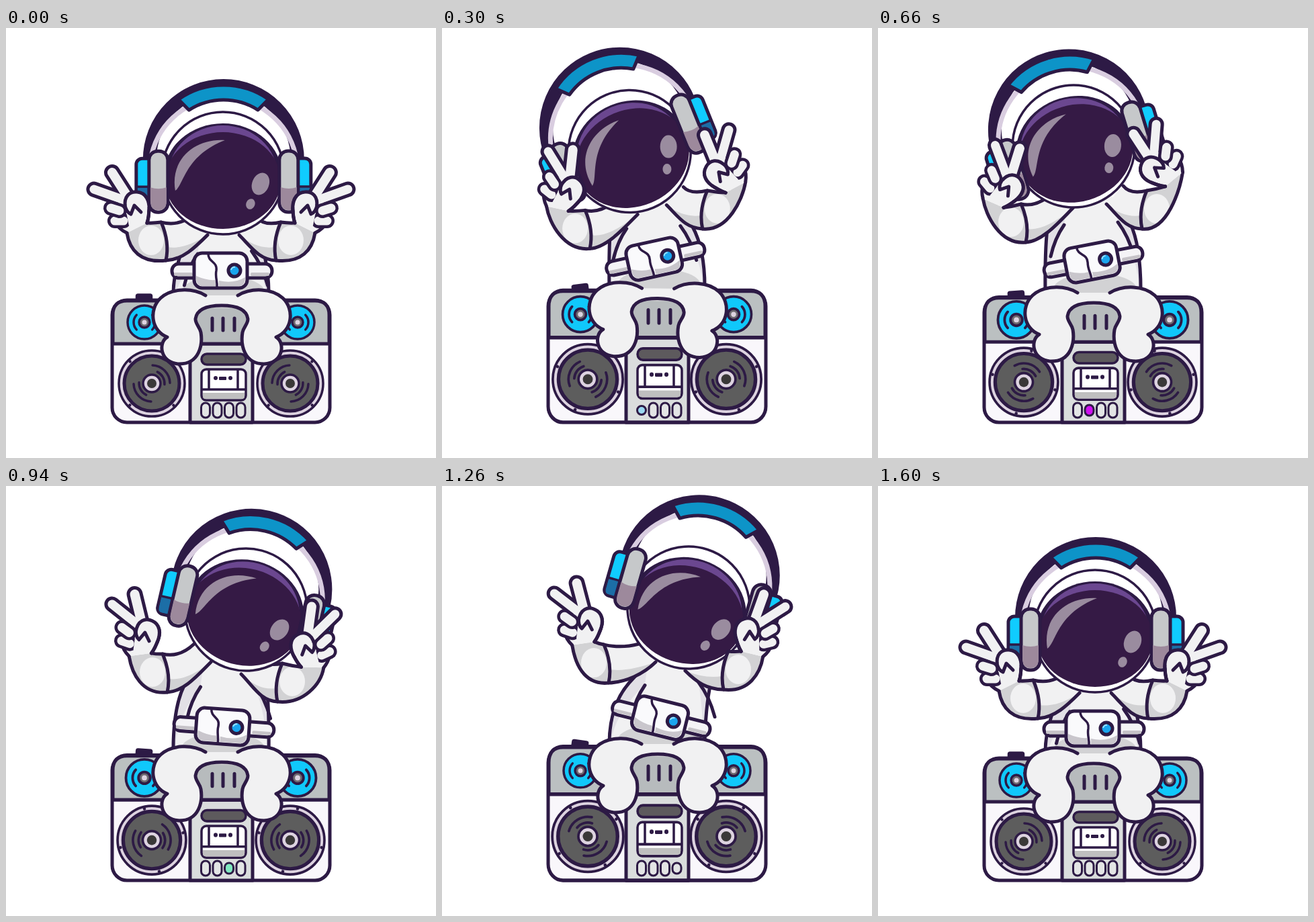
An HTML page that plays this animation: 640x640 px, repeating every 1.62 s.

```html
<!DOCTYPE html>
<html lang="en">
<head>
<meta charset="utf-8">
<title>Astronaut on a boombox</title>
<style>
html, body { margin: 0; width: 100%; height: 100%; overflow: hidden; background: #fff; }
svg { display: block; width: 100vw; height: 100vh; }
.o { stroke: #2d1a45; stroke-width: 5; stroke-linecap: round; stroke-linejoin: round; }
.t { stroke-width: 3.5; }
.n { fill: none; }
.suit { fill: #f1f1f2; }
.shade { fill: #d2d2d4; }
.ink { fill: #2d1a45; }
</style>
</head>
<body>
<svg id="stage" viewBox="0 0 640 640"></svg>
<script>
const LOOP = 1620, SPAN = 1600;
const times = [0, 160, 480, 660, 940, 1260];

// x, y, angle
const headKeys = [[323, 216, 0], [293, 196, -15], [271, 172, -28], [291, 176, -17], [357, 184, 15], [367, 181, 18]];
const phoneKeys = [[324, 228, 0], [295, 199, -14.5], [264, 161, -27], [293, 182, -17], [358, 185, 13], [374, 164, 16]];
const pouchKeys = [[319, 361, 0], [317, 351, -7], [314, 338, -17], [318, 348, -11], [322, 358, 4], [324, 345, 14]];
// box stretch, leg lift, leg angle, tweeter scale, woofer scale
const baseKeys = [[1, 0, 0, 1, 1], [1.052, -4, 0, 1.1, 1.04], [1.092, -16, 1.5, 1, 1.08],
  [1.024, -4, 0, 1.1, 1.04], [1.024, -2, 0, 1.1, 1.04], [1.095, -14, 0, 1, 1.08]];
// hand x, y, angle, sleeve dx, dy, shoulder x, y
const leftKeys = [[193, 260, 0, 0, 0, 300, 308], [191, 242, 23, -10, -9, 297, 288], [198, 237, 54, -25, -27, 285, 268],
  [199, 235, 50, -18, -27, 290, 268], [210, 215, 19, 2, -39, 305, 262], [220, 198, 18, 10, -53, 318, 262]];
const rightKeys = [[193, 260, 0, 0, 0, 293, 308], [216, 228, 35, 8, -29, 300, 280], [247, 203, 72, 19, -62, 310, 250],
  [233, 208, 66, 9, -47, 300, 262], [198, 235, 25, -2, -25, 290, 280], [185, 213, 13, -17, -43, 278, 275]];

// cyclic cubic through the keys
function sample(keys, t) {
  t %= SPAN;
  const n = times.length;
  const at = i => times[(i + n) % n] + SPAN * Math.floor(i / n);
  let i = n - 1;
  while (times[i] > t) i--;
  const h = at(i + 1) - at(i), u = (t - at(i)) / h, u2 = u * u, u3 = u2 * u;
  return keys[0].map((_, c) => {
    const v = j => keys[(j + n) % n][c];
    const slope = j => (v(j + 1) - v(j - 1)) / (at(j + 1) - at(j - 1)) * h;
    return v(i) * (2 * u3 - 3 * u2 + 1) + v(i + 1) * (3 * u2 - 2 * u3) +
      slope(i) * (u3 - 2 * u2 + u) + slope(i + 1) * (u3 - u2);
  });
}

const rect = (x, y, w, h, r, fill, cls = 'o') =>
  `<rect x="${x}" y="${y}" width="${w}" height="${h}" rx="${r}" fill="${fill}" class="${cls}"/>`;
const disc = (r, fill, cls = '') => `<circle r="${r}" fill="${fill}" class="${cls}"/>`;
const line = (d, cls = 'o n') => `<path d="${d}" class="${cls}"/>`;
const stroke = (d, color, w) =>
  `<path d="${d}" fill="none" stroke="${color}" stroke-width="${w}" stroke-linecap="round"/>`;
const flip = (s, w = 640) => `<g transform="translate(${w} 0) scale(-1 1)">${s}</g>`;
const both = s => s + flip(s, 0);

function arcPair(r, half) {
  const x = r * Math.cos(half), y = r * Math.sin(half);
  return `M${x} ${-y}A${r} ${r} 0 0 1 ${x} ${y}M${-x} ${y}A${r} ${r} 0 0 1 ${-x} ${-y}`;
}

const screws = [45, 135, 225, 315].map(a =>
  `<circle cx="46" r="2.2" class="ink" transform="rotate(${a})"/>`).join('');
const woofer = disc(49, '#ddd3e0', 'o t') + `<g class="spin">${screws}</g>` +
  disc(41, '#5d5d5d', 'o') +
  `<g class="spin"><path d="${arcPair(27, .75)}" class="o t n" transform="rotate(-45)"/>
  <path d="${arcPair(19, .6)}" class="o t n" transform="rotate(-30)"/></g>` +
  disc(13, '#ddd3e0', 'o t') + disc(7, '#3a3838');
const tweeter = disc(25, '#10c8fb', 'o t') +
  line(arcPair(16, .75), 'o t n') + disc(8, '#6d6a70', 'o t') + disc(3.5, '#ddd3e0');

const box = rect(158, 405, 324, 182, 22, '#f9f7fb') +
  `<path d="M159 470V427Q159 406 180 406H460Q481 406 481 427V470Z" class="o" fill="#bbc0c1"/>` +
  rect(274, 470, 93, 117, 0, '#dadddd') +
  `<path d="M274 470H367L360 430Q350 407 321 407Q292 407 282 430Z" fill="#b7bbbd"/>` +
  line('M274 470H367') + line('M307 432V450M323 432V450M340 432V450') +
  rect(291, 485, 66, 16, 8, '#5d5a5d', 'o t') +
  rect(291, 508, 66, 46, 7, '#fff', 'o t') +
  `<path d="M293 543H355V549Q355 552 351 552H297Q293 552 293 549Z" fill="#bfbfbf"/>` +
  line('M302 509V537M345 509V537M292 538H356', 'o t n') +
  rect(317, 519, 11, 5, 1, '#2d1a45', '') +
  '<circle cx="312" cy="521" r="3" class="ink"/><circle cx="334" cy="521" r="3" class="ink"/>';

const buttons = [297, 314.5, 332, 349.5].map(x => rect(x - 6.5, 558, 13, 22, 6.5, '#e3e5e5', 'o btn')).join('');

const legs = 'M297 398C277 386 246 387 230 402C212 419 216 451 240 460C226 468 229 499 258 500' +
  'C288 500 293 471 290 453C288 444 282 441 282 433C284 418 300 413 321 413' +
  'C342 413 358 418 360 433C360 441 354 444 352 453C349 471 354 500 384 500' +
  'C413 499 416 468 402 460C426 451 430 419 412 402C396 387 365 386 345 398';

const pouch = rect(-72, -10, 50, 21, 10, '#f4f3f6') + rect(26, -10, 51, 21, 10, '#f4f3f6') +
  rect(-69, 3, 28, 5, 2, '#c6c3c8', '') + rect(45, 3, 28, 5, 2, '#c6c3c8', '') +
  rect(-39, -26, 79, 52, 12, '#fafafc') +
  `<path d="M-36 8Q-20 15 -8 14L-5 23H-28Q-36 22 -36 12ZM-2 15Q20 20 37 10Q37 23 28 23H-2Z" fill="#c9c6cc"/>` +
  line('M-18 -25C-18 -12 -4 -14 -6 0C-8 10 -4 16 -5 25', 'o t n') +
  `<g transform="translate(21 0)">${disc(9, '#1aa5ee', 'o')}<path d="M-5 -1A5 5 0 0 1 1 -5" fill="none" stroke="#9be3ff" stroke-width="2"/></g>`;

const helmet = disc(91, '#fff', 'o t') +
  `<ellipse cy="4" rx="88" ry="78" class="ink"/>
  <ellipse cy="3" rx="81" ry="74" fill="#6b4790"/>
  <ellipse cy="11" rx="86" ry="72" fill="#351a45"/>
  <path d="M3 -49C-40 -52 -79 -22 -71 26C-58 18 -57 -26 3 -49Z" fill="#9a8c9f"/>
  <ellipse cx="56" cy="16" rx="12.5" ry="17" transform="rotate(22 56 16)" fill="#9a8c9f"/>
  <ellipse cx="41" cy="46" rx="6.5" ry="8" transform="rotate(22 41 46)" fill="#9a8c9f"/>`;

function bandPad() {
  const p = (r, a) => `${r * Math.sin(a)} ${-26 - r * Math.cos(a)}`;
  return `<path d="M${p(117, -.61)}A117 117 0 0 1 ${p(117, .61)}L${p(95, .57)}A95 95 0 0 0 ${p(95, -.57)}Z" fill="#0d94c8" class="o"/>`;
}
const bandArc = 'M-107 -40A110 110 0 0 1 107 -40';
const sideBar = 'M-110 -32A110 110 0 0 1 110 -32';
const ear = rect(-130, -34, 28, 68, 9, '#10ccff') +
  '<path d="M-128 8H-104V32H-122Q-128 32 -128 25Z" fill="#1c6ea6"/>' + line('M-129 8H-106', 'o t') +
  rect(-111, -45, 28, 91, 13, '#c6c8ca') +
  '<path d="M-109 9Q-97 13 -85 9V31Q-86 43 -97 43Q-108 43 -109 31Z" fill="#9d899c"/>';
const phones = stroke(sideBar, '#2d1a45', 20) + stroke(bandArc, '#d9cde0', 7) + bandPad() + both(ear);

const finger1 = 'M-62 -20L-14 -3', finger2 = 'M-35 -45L-10 -6';
const curl = d => stroke(d, '#2d1a45', 22) + stroke(d, '#f1f1f2', 13);
const palm = 'M-13 45C-28 38 -38 22 -36 6L-20 -8C-8 -20 20 -20 20 6C20 18 19 24 17 30';
const hand = stroke(finger1, '#2d1a45', 23) + stroke(finger2, '#2d1a45', 24) +
  line(palm, 'o suit') + stroke(finger1, '#f1f1f2', 13) + stroke(finger2, '#f1f1f2', 14) +
  curl('M-31 27L-18 27') + curl('M-37 8L-24 12') +
  line('M-15 8C-19 -10 -8 -17 2 -16C16 -15 21 -2 20 12', 'o suit') +
  '<path d="M-16 4L-10 34L10 34L18 8Z" class="suit"/>' +
  line('M-16 4Q-14 14 -7 17L-2 4L8 14M20 8Q20 22 17 30');

const upper = id => `<g id="up${id}"><path class="suit"/><path class="shade"/><path class="o n"/></g>`;
const fore = id => `<g id="fore${id}"><path class="shade"/><ellipse rx="19" ry="22" class="suit"/><path class="o n"/><g>${hand}</g></g>`;

const stage = document.getElementById('stage');
stage.innerHTML = `
<g id="knob">${rect(-11, -4, 22, 10, 2, '#2d1a45', 'o t')}</g>
<g id="box">${box}</g>
<g class="tweet">${tweeter}</g><g class="tweet">${tweeter}</g>
<g class="woof">${woofer}</g><g class="woof">${woofer}</g>
${buttons}
<path id="pack" class="o" fill="#e2e0e6"/>
<path id="torso" class="suit"/>
<ellipse id="waist" rx="62" ry="24" class="shade"/>
<path id="folds" class="o n"/>
${upper('L')}${flip(upper('R'))}
<g id="pouch">${pouch}</g>
<g id="legs">${line(legs, 'o suit')}</g>
<g id="helmet">${helmet}</g>
<g id="phones">${phones}</g>
${fore('L')}${flip(fore('R'))}`;

const el = id => document.getElementById(id);
const all = sel => [...stage.querySelectorAll(sel)];
const set = (node, name, value) => node.setAttribute(name, value);
const place = (node, x, y, a = 0, sx = 1, sy = sx) =>
  set(node, 'transform', `translate(${x} ${y}) rotate(${a}) scale(${sx} ${sy})`);

const tweets = all('.tweet'), woofs = all('.woof'), spins = all('.spin'), btns = all('.btn');
const parts = {};
for (const s of ['L', 'R']) parts[s] = { up: el('up' + s).children, fore: el('fore' + s).children };

function poseArm(side, [x, y, a, dx, dy, ax, ay]) {
  const { up, fore } = parts[side];
  const c = Math.cos(a * Math.PI / 180), s = Math.sin(a * Math.PI / 180);
  const spin = (px, py) => [x + px * c - py * s, y + px * s + py * c];
  const [ox, oy] = spin(-13, 45), [ix, iy] = spin(17, 30);
  const tx = 231 + dx, ty = 289 + dy, bx = 238 + dx, by = 346 + dy;
  const seam = `Q${tx + 13} ${ty + 30} ${tx} ${ty}`;
  const top = `M${tx} ${ty}Q${tx + 25} ${ty + 6} ${ax - 25} ${ay - 27}`;
  const low = `C${ax - 18} ${ay + 18} ${bx + 25} ${by - 1} ${bx} ${by}`;
  set(up[0], 'd', `${top}L${ax} ${ay}${low}${seam}Z`);
  set(up[1], 'd', `M${ax} ${ay}${low}L${bx + 2} ${by - 20}Q${bx + 28} ${by - 16} ${ax} ${ay}Z`);
  set(up[2], 'd', `${top}M${ax} ${ay}${low}`);
  const outer = `M${ox} ${oy}C${ox + 4} ${oy + 25} ${bx - 38} ${by + 4} ${bx} ${by}${seam}`;
  const inner = `Q${(tx + ix) / 2} ${(ty + iy) / 2 + 1} ${ix} ${iy}`;
  set(fore[0], 'd', outer + inner + 'Z');
  set(fore[1], 'cx', tx - 15);
  set(fore[1], 'cy', ty + 27);
  set(fore[2], 'd', outer + inner);
  place(fore[3], x, y, a);
}

const lights = [[76, 201, 255], [208, 16, 240], [128, 232, 192], [255, 210, 74]];
const plain = [227, 229, 229];

function pressButtons(t) {
  btns.forEach((b, i) => {
    const u = Math.min(1, Math.max(0, t / 400 - i));
    const h = 22 - 9 * Math.sin(2 * Math.PI * u) ** 2;
    const glow = Math.max(0, Math.min(1, (u - .22) / .1, (.8 - u) / .1));
    set(b, 'y', 569 - h / 2);
    set(b, 'height', h);
    set(b, 'fill', `rgb(${plain.map((v, k) => Math.round(v + (lights[i][k] - v) * glow))})`);
    b.style.strokeWidth = 3;
  });
}

function draw(now) {
  const t = Math.min(now % LOOP, SPAN);
  const [sy, lift, lean, small, big] = sample(baseKeys, t);
  const left = sample(leftKeys, t), right = sample(rightKeys, t);
  const fromFloor = y => 588 + (y - 588) * sy;

  set(el('box'), 'transform', `translate(0 ${588 - 588 * sy}) scale(1 ${sy})`);
  place(el('knob'), 205.5, fromFloor(405) - 4, -8 * Math.sin(t / SPAN * 2 * Math.PI));
  tweets.forEach((n, i) => place(n, i ? 434 : 206, fromFloor(438), 0, i ? -small : small, small));
  woofs.forEach((n, i) => place(n, i ? 423 : 217, fromFloor(529) - (sy - 1) * 20, 0, i ? -big : big, big));
  spins.forEach(n => set(n, 'transform', `rotate(${t / SPAN * 360 + 180})`));
  pressButtons(t);

  const nx = (left[5] + 640 - right[5]) / 2, ny = (left[6] + right[6]) / 2, hip = 402 + lift;
  set(el('pack'), 'd', `M249 ${hip}Q248 ${ny + 60} ${nx - 62} ${ny + 25}L${nx - 30} ${ny - 10}H${nx + 30}L${nx + 60} ${ny + 25}Q392 ${ny + 60} 391 ${hip}Z`);
  set(el('torso'), 'd', `M252 ${hip}Q250 ${ny + 80} ${nx - 38} ${ny + 26}L${nx - 30} ${ny - 30}H${nx + 30}L${nx + 42} ${ny + 24}Q390 ${ny + 80} 388 ${hip}Z`);
  place(el('waist'), 323, hip - 9);
  set(el('folds'), 'd', `M${nx - 38} ${ny + 28}Q${nx - 52} ${ny + 48} ${nx - 58} ${ny + 75}M${nx + 42} ${ny + 24}Q${nx + 58} ${ny + 45} ${nx + 66} ${ny + 75}`);

  place(el('pouch'), ...sample(pouchKeys, t));
  set(el('legs'), 'transform', `translate(0 ${lift}) rotate(${lean} 321 445)`);
  place(el('helmet'), ...sample(headKeys, t));
  place(el('phones'), ...sample(phoneKeys, t));
  poseArm('L', left);
  poseArm('R', right);
}

const start = performance.now();
function tick() {
  draw(performance.now() - start);
  requestAnimationFrame(tick);
}
tick();
</script>
</body>
</html>
```
